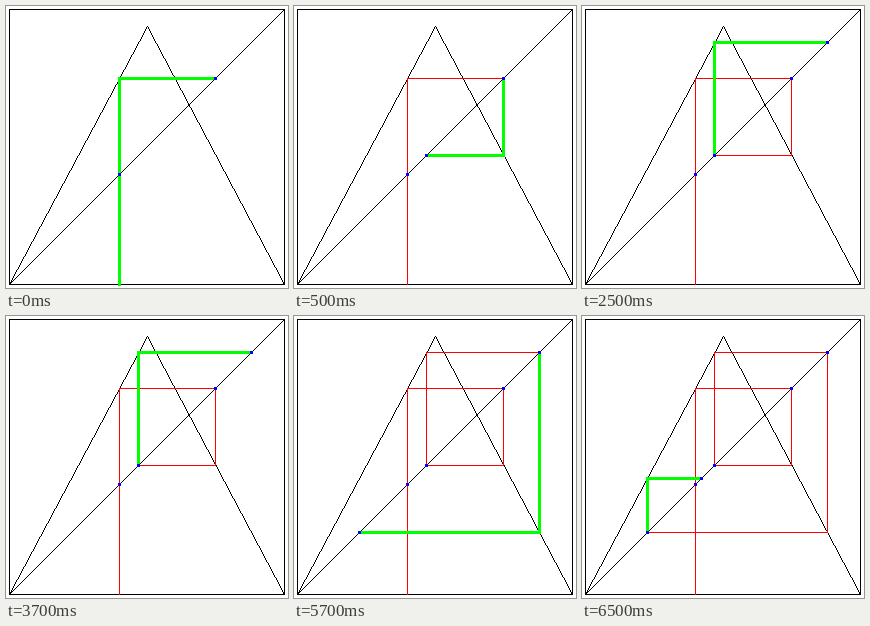
A matplotlib script that plays this animation: 282 by 282 pixels, repeating every 8 s.

```python
"""Cobweb diagram of the tent map, one iteration at a time."""
import numpy as np
import matplotlib.pyplot as plt
from matplotlib.animation import FuncAnimation

SIZE, DPI = 282, 94
LEFT, BASE, SPAN = 3, 278, 275
SLOPE = 1.875
START, STEPS = 110, 5
INTERVAL, FRAMES = 500, 16

WHITE, BLACK = (255, 255, 255), (0, 0, 0)
RED, GREEN, BLUE = (255, 0, 0), (0, 255, 0), (0, 0, 255)


def tent(x):
    return round(SLOPE * min(x, SPAN - x))


def line(img, start, end, color, grow=0):
    """Draw a line in map units; grow adds pixels on every side."""
    (x0, y0), (x1, y1) = start, end
    count = max(abs(x1 - x0), abs(y1 - y0)) + 1
    cols = LEFT + np.floor(np.linspace(x0, x1, count) + 0.5).astype(int)
    rows = BASE - np.floor(np.linspace(y0, y1, count) + 0.5).astype(int)
    for dx in range(-grow, grow + 1):
        for dy in range(-grow, grow + 1):
            img[rows + dy, cols + dx] = color


def polyline(img, points, color, grow=0):
    for start, end in zip(points, points[1:]):
        line(img, start, end, color, grow)


def make_background():
    img = np.full((SIZE, SIZE, 3), WHITE, dtype=np.uint8)
    corners = [(0, 0), (SPAN, 0), (SPAN, SPAN), (0, SPAN), (0, 0)]
    polyline(img, corners, BLACK)
    line(img, (0, 0), (SPAN, SPAN), BLACK)
    middle = (SPAN + 1) // 2
    peak = round(SLOPE * SPAN / 2)
    polyline(img, [(0, 0), (middle, peak), (SPAN, 0)], BLACK)
    return img


background = make_background()
orbit = [START]
for _ in range(STEPS):
    orbit.append(tent(orbit[-1]))


def path(step):
    """Go from the diagonal to the curve, then back to the diagonal."""
    x, y = orbit[step], orbit[step + 1]
    return [(x, x if step else 0), (x, y), (y, y)]


def render(current):
    img = background.copy()
    for step in range(current):
        polyline(img, path(step), RED)
    polyline(img, path(current), GREEN, grow=1)
    for x in orbit[:current + 2]:
        line(img, (x, x), (x, x), BLUE, grow=1)
    return img


fig = plt.figure(figsize=(SIZE / DPI, SIZE / DPI), dpi=DPI)
ax = fig.add_axes([0, 0, 1, 1])
ax.axis("off")
picture = ax.imshow(render(0), interpolation="nearest", aspect="auto")


def update(frame):
    # The first step is short; each later one holds for four ticks.
    picture.set_data(render((frame + 3) // 4))
    return [picture]


animation = FuncAnimation(fig, update, frames=FRAMES, interval=INTERVAL,
                          repeat=True, repeat_delay=0)
plt.show()
```
